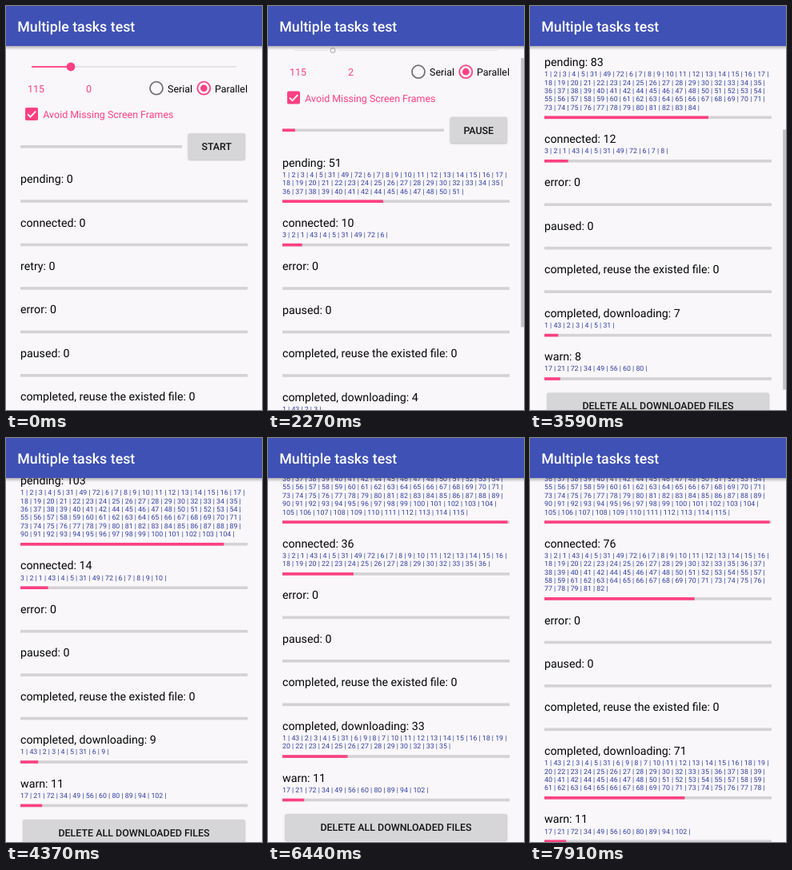
Recreate the animation shown at these times as an HTML page with a canvas. Size 320 by 505 pixels, loop 8 s.

```html
<!DOCTYPE html>
<html lang="en">
<head>
<meta charset="utf-8">
<title>Multiple tasks test</title>
<style>
  html, body { margin: 0; width: 100%; height: 100%; overflow: hidden; background: #f9f7fa; }
  canvas { display: block; width: 320px; height: 505px; }
</style>
</head>
<body>
<canvas id="stage"></canvas>
<script>
const W = 320, H = 505, LOOP = 8000, START = 460, TOTAL = 115, BAR_H = 50;
const LEFT = 18, WIDTH = 284, LINE = 10.35, ROW = 54.45, LIST_SIZE = 8.77;
const PINK = '#ff4081', TRACK = '#d4d2d5', INK = '#050505';
const canvas = document.getElementById('stage');
const ctx = canvas.getContext('2d');
const dpr = window.devicePixelRatio || 1;
canvas.width = W * dpr;
canvas.height = H * dpr;
ctx.textRendering = 'geometricPrecision';

// A few tasks jump the queue, the rest follow in order.
const WARN = [17, 21, 72, 34, 49, 56, 60, 80, 89, 94, 102];
const all = Array.from({ length: TOTAL }, (_, i) => i + 1);
const queue = (first, skip) => [...first, ...all.filter(id => !first.includes(id) && !skip.includes(id))];
const PENDING = queue([1, 2, 3, 4, 5, 31, 49, 72], [43]);
const CONNECTED = queue([3, 2, 1, 43, 4, 5, 31], WARN);
CONNECTED.splice(7, 0, 49, 72);
const DONE = queue([1, 43, 2, 3, 4, 5, 31, 6, 9, 8, 7], WARN);

const clamp01 = v => Math.min(1, Math.max(0, v));
const ramp = (t, from, to) => clamp01((t - from) / (to - from));

// Quick start, slow middle, then two faster runs with a short rest between.
const downloads = (t, [a, b, c, d]) => Math.floor(1e-6 +
  a * ramp(t, START, 1190) +
  b * ramp(t, 1190, 4370) ** 1.4 +
  c * ramp(t, 4370, 6440) ** 1.4 +
  d * ramp(t, 6600, 7910));

const pendingAt = t => Math.round(Math.min(114, 24 * ramp(t, START, 1190) + 0.0247 * Math.max(0, t - 1190)));
const connectedAt = t => downloads(t, [9, 5, 22, 40]);
const doneAt = t => downloads(t, [3, 6, 24, 38]);
const warnAt = t => Math.floor(Math.min(WARN.length, 0.0029 * Math.max(0, t - 500)));

const scrollAt = t => 101.5 * ramp(t, 2180, 2630) + 44.5 * ramp(t, 2630, 3590) +
  17 * ramp(t, 3590, 3800) + 38 * ramp(t, 4800, 5350);
const thumbAt = t => ramp(t, 2150, 2200) - ramp(t, 4000, 4250) + ramp(t, 4780, 4830) - ramp(t, 5650, 5900);

function text(str, x, y, size, color, weight = 400, align = 'left') {
  ctx.font = `${weight} ${size}px Roboto, sans-serif`;
  ctx.textAlign = align;
  ctx.fillStyle = color;
  ctx.fillText(str, x, y);
}

function rect(x, y, w, h, color) {
  ctx.fillStyle = color;
  ctx.fillRect(x, y, w, h);
}

function progress(y, w, part) {
  rect(LEFT, y - 1.8, w, 3.6, TRACK);
  rect(LEFT, y - 1.8, w * part, 3.6, PINK);
}

function circle(x, y, r, color, stroke) {
  ctx.beginPath();
  ctx.arc(x, y, r, 0, Math.PI * 2);
  if (stroke) {
    ctx.lineWidth = stroke;
    ctx.strokeStyle = color;
    ctx.stroke();
  } else {
    ctx.fillStyle = color;
    ctx.fill();
  }
}

function roundRect(x, y, w, h, r, color) {
  ctx.beginPath();
  ctx.roundRect(x, y, w, h, r);
  ctx.fillStyle = color;
  ctx.fill();
}

function button(x, y, w, h, label, pressed) {
  ctx.save();
  ctx.shadowColor = `rgba(0,0,0,${pressed ? 0.35 : 0.25})`;
  ctx.shadowBlur = (pressed ? 5 : 2) * dpr;
  ctx.shadowOffsetY = (pressed ? 2 : 0.8) * dpr;
  roundRect(x, y, w, h, 1.8, pressed ? '#cfced0' : '#d6d5d7');
  ctx.restore();
  text(label, x + w / 2, y + h / 2 + 4.5, 12.44, '#141414', 500, 'center');
}

function slider(running) {
  if (running) {
    rect(32, 75.6, 43, 0.9, '#e3e1e4');
    rect(88, 75.6, 200, 0.9, '#e3e1e4');
    circle(81, 76, 2.9, '#bdbbbe', 1.3);
  } else {
    rect(81, 75.5, 207, 1, '#d2cfd2');
    rect(32, 75.1, 49, 1.8, PINK);
    circle(81, 76, 5.4, PINK);
  }
}

function controls(t) {
  const running = t >= START;
  slider(running);
  text('115', 27, 107.5, 12.44, PINK);
  text(String(Math.floor(t / 1000)), 100, 107.5, 12.44, PINK);
  circle(188, 102.7, 8, '#737274', 1.8);
  text('Serial', 202, 107.5, 12.44, INK);
  circle(247.3, 102.7, 8, PINK, 1.8);
  circle(247.3, 102.7, 4.3, PINK);
  text('Parallel', 261, 107.5, 12.44, INK);

  roundRect(24, 127, 16, 16, 1.8, PINK);
  ctx.beginPath();
  ctx.moveTo(27, 135.2);
  ctx.lineTo(30.5, 138.7);
  ctx.lineTo(37.2, 131.6);
  ctx.lineWidth = 1.8;
  ctx.strokeStyle = '#fff';
  ctx.stroke();
  text('Avoid Missing Screen Frames', 46.3, 140.2, 12.44, PINK);
  button(227.7, 159.3, 71.2, 32.6, running ? 'PAUSE' : 'START', running && t < 1300);
}

function wrap(list) {
  ctx.font = `${LIST_SIZE}px Roboto, sans-serif`;
  const lines = [];
  let line = '';
  for (const id of list) {
    const longer = `${line}${line && ' '}${id} |`;
    if (ctx.measureText(longer).width > WIDTH) {
      lines.push(line);
      line = `${id} |`;
    } else {
      line = longer;
    }
  }
  return line ? [...lines, line] : lines;
}

// Draws one counter block and returns the y of the next one.
function section(y, name, n, list = []) {
  const lines = wrap(list.slice(0, n));
  text(`${name}: ${n}`, LEFT, y + 5.1, 14.22, INK);
  lines.forEach((line, i) => text(line, LEFT, y + 18.4 + i * LINE, LIST_SIZE, '#303f9f'));
  const extra = Math.max(0, lines.length - 1) * LINE;
  progress(y + 28 + extra, WIDTH, n / TOTAL);
  return y + ROW + extra;
}

function toolbar() {
  const shade = ctx.createLinearGradient(0, BAR_H, 0, BAR_H + 5);
  shade.addColorStop(0, 'rgba(0,0,0,0.28)');
  shade.addColorStop(1, 'rgba(0,0,0,0)');
  rect(0, BAR_H, W, 5, shade);
  rect(0, 0, W, BAR_H, '#3f51b5');
  text('Multiple tasks test', 14.2, 32.3, 17.78, '#fff', 500);
}

function scrollThumb(scroll, content, alpha) {
  const view = H - BAR_H, k = view / content;
  rect(316.2, BAR_H + scroll * k, 3.8, view * k, `rgba(0,0,0,${0.22 * alpha})`);
}

function draw(t) {
  const pending = pendingAt(t), connected = connectedAt(t);
  const done = doneAt(t), warn = warnAt(t), scroll = scrollAt(t);

  ctx.setTransform(dpr, 0, 0, dpr, 0, 0);
  rect(0, 0, W, H, '#f9f7fa');
  ctx.save();
  ctx.translate(0, -scroll);
  controls(t);
  progress(175.8, 202, (done + warn) / TOTAL);

  let y = section(216, 'pending', pending, PENDING);
  y = section(y, 'connected', connected, CONNECTED);
  if (t < START) y = section(y, 'retry', 0);
  for (const name of ['error', 'paused', 'completed, reuse the existed file']) y = section(y, name, 0);
  y = section(y, 'completed, downloading', done, DONE);
  y = section(y, 'warn', warn, WARN);
  button(21.3, y - 9, 277.5, 33, 'DELETE ALL DOWNLOADED FILES', false);
  ctx.restore();

  scrollThumb(scroll, y + 48 - BAR_H, clamp01(thumbAt(t)));
  toolbar();
}

const begin = performance.now();
function tick() {
  draw((performance.now() - begin) % LOOP);
  requestAnimationFrame(tick);
}
tick();
</script>
</body>
</html>
```
